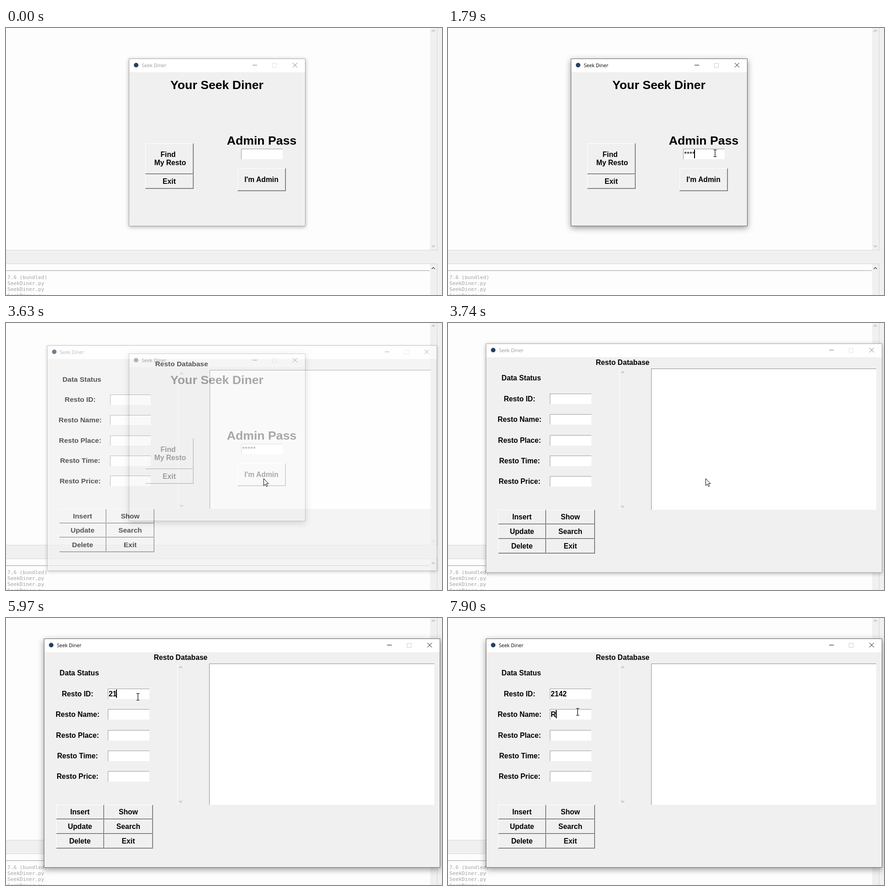
Recreate the animation shown at these times as an HTML page. Size 955 px wide and 586 px high, loop 7.99 s.

```html
<!DOCTYPE html>
<html lang="en">
<head>
<meta charset="utf-8">
<title>Seek Diner</title>
<style>
  html, body { margin: 0; width: 100%; height: 100%; overflow: hidden; background: #fdfdfd; }
  svg { display: block; width: 955px; height: 586px; }
  rect { shape-rendering: crispEdges; }
  text { white-space: pre; }
  .label { font: bold 15.7px "Liberation Sans", Arial, sans-serif; }
  .heading { font: bold 26.67px "Liberation Sans", Arial, sans-serif; }
  .stars { font: 15.4px "Liberation Sans", Arial, sans-serif; }
  .caption { font: 10.7px "Open Sans", "Noto Sans", sans-serif; }
  .log { font: 11.2px "DejaVu Sans Mono", monospace; fill: #a3a3a3; }
  .mid { text-anchor: middle; }
  .window .base { fill: #aaa; filter: drop-shadow(0 2px 4px rgba(0,0,0,.3)); }
  .window .caption { fill: #999; }
  .window .control { stroke: #777; }
  .window .grow { stroke: #e2e2e2; }
  .window.active .base { fill: #666; filter: drop-shadow(0 4px 7px rgba(0,0,0,.4)); }
  .window.active .caption { fill: #000; }
  .window.active .control { stroke: #000; }
  .window.active .grow { stroke: #ccc; }
</style>
</head>
<body>
<svg id="stage" viewBox="0 0 955 586"></svg>
<script>
const LOOP = 7990;
const APP = "Seek Diner";
const FACE = "#f0f0f0", PAPER = "#fdfdfd";

const rect = (x, y, w, h, fill) =>
  `<rect x="${x}" y="${y}" width="${w}" height="${h}" fill="${fill}"/>`;
const text = (x, y, cls, str, id = "") =>
  `<text x="${x}" y="${y}" class="${cls}"${id && ` id="${id}"`}>${str}</text>`;
const chevron = (x, y, dir, color) =>
  `<path d="M${x - 3.5} ${y + 2 * dir}l3.5 ${-3.5 * dir}l3.5 ${3.5 * dir}" fill="none" stroke="${color}" stroke-width="1.5"/>`;
const caret = (id, y, h) =>
  `<rect id="${id}" y="${y}" width="2" height="${h}" fill="#000"/>`;

function bevel(x, y, w, h, sunken = false) {
  const [light, dark, inner] = sunken ? ["#696969", "#fff", FACE] : ["#fff", "#696969", "#a0a0a0"];
  return rect(x, y, w, h, dark) + rect(x, y, w - 1, h - 1, light) +
    rect(x + 1, y + 1, w - 2, h - 2, inner) + rect(x + 1, y + 1, w - 3, h - 3, FACE);
}

function button(x, y, w, h, str, sunken = false) {
  const shift = sunken ? 1 : 0;
  return bevel(x, y, w, h, sunken) +
    text(x + w / 2 - 0.5 + shift, y + h / 2 + 5 + shift, "label mid", str);
}

const entry = (x, y, w, h) =>
  rect(x, y, w, h, "#999") + rect(x + 1, y + 1, w - 1, h - 1, "#fff");

function appWindow(id, x, y, w, h, body) {
  const right = x + w, cy = y + 14.5;
  return `<g id="${id}" class="window">
    <rect class="base" x="${x}" y="${y}" width="${w}" height="${h}"/>
    ${rect(x + 1, y + 1, w - 2, 29, "#fff")}${rect(x + 1, y + 30, w - 2, h - 31, FACE)}
    <circle cx="${x + 16}" cy="${cy}" r="5" fill="#24415f"/>
    ${text(x + 28.5, y + 19, "caption", APP)}
    <path class="control" fill="none" d="M${right - 116} ${cy}h10M${right - 28} ${cy - 5}l10 10m0 -10l-10 10"/>
    <rect class="grow" fill="none" x="${right - 72.5}" y="${cy - 4}" width="9" height="9"/>
    ${body}</g>`;
}

function editor() {
  const logLines = [0, 1, 2].map(i => text(3, 564 + 13.4 * i, "log", "SeekDiner.py")).join("");
  return rect(0, 0, 955, 586, FACE) +
    rect(0, 0, 929, 487, PAPER) + rect(0, 487, 946, 1, "#d6d6d6") +
    rect(0, 517, 946, 1, "#d6d6d6") + rect(0, 518, 929, 68, PAPER) +
    rect(944, 0, 1, 488, "#d6d6d6") + rect(944, 517, 1, 69, "#d6d6d6") +
    rect(0, 532, 928, 1, "#9a9a9a") +
    chevron(936, 6, 1, "#b5b5b5") + chevron(936, 479, -1, "#b5b5b5") + chevron(936, 527, 1, "#505050") +
    `<text x="90.5" y="550.5" class="log" text-anchor="end">Python 3.7.6 (bundled)</text>` + logLines;
}

const login = appWindow("login", 269, 67, 387, 368,
  text(462, 134, "heading mid", `Your ${APP}`) +
  text(560, 256, "heading mid", "Admin Pass") +
  bevel(305, 253, 106, 68) +
  text(355, 283, "label mid", "Find") + text(359.5, 301, "label mid", "My Resto") +
  button(305, 321, 106, 32, "Exit") +
  entry(515, 265, 91, 23) + text(517, 281, "stars", "", "pass") + caret("passCaret", 267, 19) +
  `<g id="raised">${button(507, 308, 106, 50, "I'm Admin")}</g>` +
  `<g id="pressed">${button(507, 308, 106, 50, "I'm Admin", true)}</g>`);

const rowY = i => Math.round(155 + 45.25 * i);
const fields = ["ID", "Name", "Place", "Time", "Price"].map((name, i) =>
  text(156.7, rowY(i) + 16.5, "label mid", `Resto ${name}:`) + entry(223, rowY(i), 91, 23)).join("");
const actions = ["Insert", "Show", "Update", "Search", "Delete", "Exit"].map((name, i) =>
  button(i % 2 ? 215 : 110, 410 + 32 * (i >> 1), i % 2 ? 107 : 105, 32, name)).join("");

const database = appWindow("database", 83, 45, 868, 503,
  text(382.5, 92, "label mid", "Resto Database") + text(160.5, 126, "label mid", "Data Status") +
  fields + actions +
  rect(375, 100, 1, 310, "#fff") + chevron(382.5, 108, 1, "#b5b5b5") + chevron(382.5, 403, -1, "#b5b5b5") +
  rect(445, 100, 493, 310, "#8c8c8c") + rect(446, 101, 492, 309, "#fff") +
  text(225, 171.5, "label", "", "idText") + caret("idCaret", 157, 18) +
  text(225, 216.5, "label", "", "nameText") + caret("nameCaret", 202, 18));

const pointer = `<path id="arrow" d="M.5 .5v15.4l3.5 -3.4l2.5 5.4l2.3 -1l-2.4 -5.3h4.6z" fill="#fff" stroke="#000"/>
  <path id="beam" d="M-3.5 -7.5h2.5q1 0 1 1v13q0 1 -1 1h-2.5M3.5 -7.5h-2.5q-1 0 -1 1v13q0 1 1 1h2.5" fill="none" stroke="#000" stroke-width="1.2"/>`;

const stage = document.getElementById("stage");
stage.innerHTML = editor() + login + database + `<g id="pointer">${pointer}</g>`;
const el = {};
stage.querySelectorAll("[id]").forEach(node => el[node.id] = node);

// Value of the latest [time, value] entry that has been reached.
const at = (t, initial, keys) => keys.reduce((v, [time, next]) => t >= time ? next : v, initial);
const show = (node, on) => node.style.display = on ? "" : "none";
const smooth = p => p * p * (3 - 2 * p);
const easeOut = p => 1 - (1 - p) ** 2;

// Pointer moves: start time, number of steps, destination, easing.
const STEP = 76.6;
const START = [780, 552];
const MOVES = [
  [70, 11, [585, 275], smooth],
  [2720, 2, [564, 341], smooth],
  [3810, 6, [366, 216], smooth],
  [4280, 11, [289, 173], easeOut],
  [6830, 7, [290, 209], smooth],
  [7440, 2, [284, 205.5], easeOut]
];

function pointerAt(t) {
  let pos = START;
  for (const [start, steps, to, ease] of MOVES) {
    if (t < start) break;
    const done = Math.floor((t - start) / STEP + 0.01);
    const p = ease(Math.min(1, pos === START ? done / (steps - 1) : (done + 1) / steps));
    pos = pos.map((v, i) => v + (to[i] - v) * p);
  }
  return pos;
}

const inside = (x, y, l, t, r, b) => x >= l && x <= r && y >= t && y <= b;

function overText(x, y, t) {
  if (t >= 3510) return [0, 1, 2, 3, 4].some(i => inside(x, y, 223, rowY(i), 314, rowY(i) + 23));
  if (inside(x, y, 269, 67, 656, 435)) return inside(x, y, 515, 265, 606, 288);
  return y < 488 || y > 518;
}

function setCaret(node, x, on) {
  node.setAttribute("x", x);
  show(node, on);
}

function render(t) {
  const stars = at(t, 0, [[1240, 1], [1470, 2], [1620, 3], [1790, 4], [2020, 5]]);
  show(el.login, t < 3740);
  el.login.classList.toggle("active", t >= 770);
  el.pass.textContent = "*".repeat(stars);
  setCaret(el.passCaret, stars ? 515 + 6 * stars : 516,
    at(t, false, [[770, true], [1310, false], [1620, true], [2250, false], [2550, true], [3420, false]]));
  const down = t >= 2950 && t < 3020;
  show(el.raised, !down);
  show(el.pressed, down);

  const scale = at(t, 0.95, [[3630, 0.984], [3660, 0.993], [3740, 1]]);
  show(el.database, t >= 3510);
  el.database.style.opacity = at(t, 0.12, [[3630, 0.66], [3660, 0.85], [3740, 1]]);
  el.database.setAttribute("transform",
    scale === 1 ? "" : `translate(516.5 296) scale(${scale}) translate(-516.5 -296)`);
  el.database.classList.toggle("active", t >= 5120);

  const digits = at(t, 0, [[5660, 1], [5970, 2], [6350, 3], [6580, 4]]);
  el.idText.textContent = "2142".slice(0, digits);
  setCaret(el.idCaret, Math.round(224 + 8.73 * digits),
    at(t, false, [[5120, true], [5740, false], [5970, true], [7210, false], [7440, true], [7520, false]]));
  el.nameText.textContent = t >= 7900 ? "R" : "";
  setCaret(el.nameCaret, t >= 7900 ? 236 : 224, t >= 7520);

  const [x, y] = pointerAt(t);
  const beam = overText(x, y, t);
  show(el.pointer, t >= 70);
  show(el.beam, beam);
  show(el.arrow, !beam);
  el.pointer.setAttribute("transform", `translate(${Math.round(x)} ${Math.round(y)})`);
}

const begin = performance.now();
function tick() {
  render((performance.now() - begin) % LOOP);
  requestAnimationFrame(tick);
}
tick();
</script>
</body>
</html>
```
